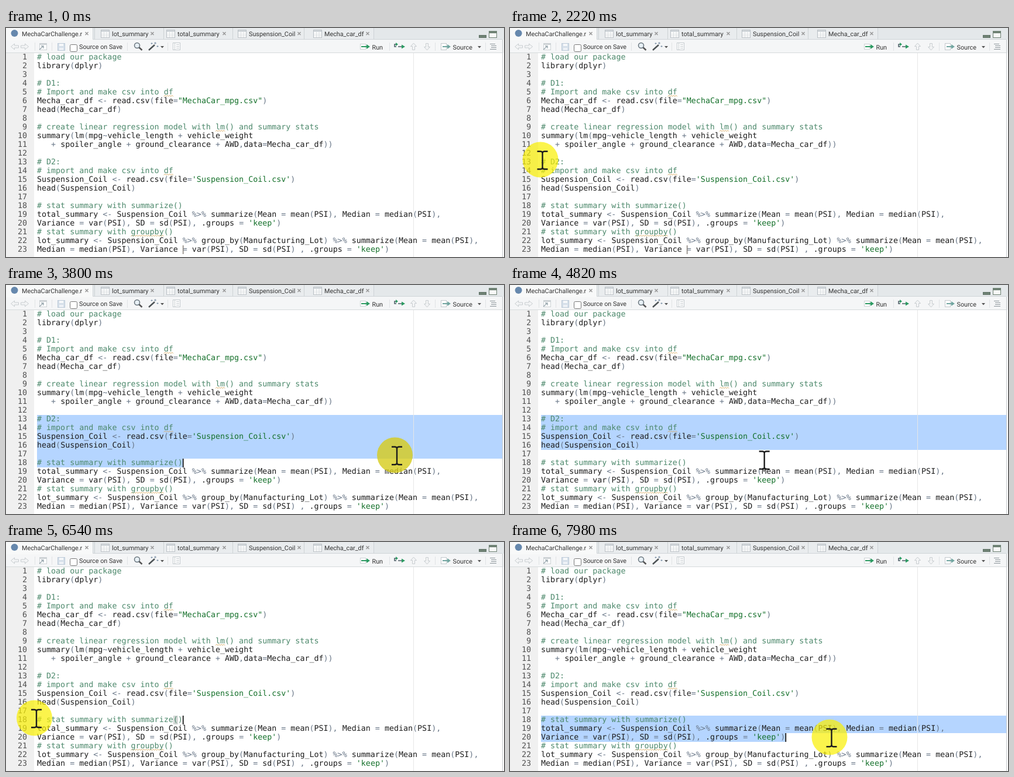
Animation, 851 px wide and 393 px high, one loop 8 s. Source, as an HTML page:

```html
<!DOCTYPE html>
<html lang="en">
<head>
<meta charset="utf-8">
<title>Script editor</title>
<style>
  html, body { margin: 0; width: 100%; height: 100%; overflow: hidden; background: #fff; }
  svg { display: block; width: 851px; height: 393px; }
  text { white-space: pre; text-rendering: geometricPrecision; }
  .code { font: 13.333px "DejaVu Sans Mono", monospace; fill: #1c1c1c; }
  .ui { font: 10.8px Roboto, sans-serif; fill: #333; }
  .num { fill: #505050; text-anchor: end; }
  .comment { fill: #4c886b; }
  .string { fill: #14702a; }
  .op { fill: #687687; }
</style>
</head>
<body>
<svg id="stage" viewBox="0 0 851 393">
  <g id="chrome"></g>
  <g id="selection" fill="#b5d5ff"></g>
  <path d="M696.5 43V393" stroke="#e6e6e6"/>
  <rect id="bracket" width="8" height="15" fill="#d2d6d4"/>
  <g id="squiggles" fill="none" stroke="#d3a04e" stroke-width=".9"></g>
  <g id="code"></g>
  <path d="M848.5 20V393" stroke="#c5c9cc"/>
  <rect id="caret" width="1.6" height="15"/>
  <g id="mouse">
    <circle id="press" cx="-3.5" cy="-1" r="30.5"/>
    <path d="M-9 -15.2H-3Q0 -15 0 -12Q0 -15 3 -15.2H9M0 -13V13M-9 15.2H-3Q0 15 0 12Q0 15 3 15.2H9"
          fill="none" stroke="#1c1c1c" stroke-width="2.4"/>
  </g>
</svg>
<script>
const LOOP = 8000, LEFT = 53, TOP = 43, ROW = 15, COL = 8.028, RIGHT = 848;
const lines = `# load our package
library(dplyr)

# D1:
# Import and make csv into df
Mecha_car_df <- read.csv(file="MechaCar_mpg.csv")
head(Mecha_car_df)

# create linear regression model with lm() and summary stats
summary(lm(mpg~vehicle_length + vehicle_weight
   + spoiler_angle + ground_clearance + AWD,data=Mecha_car_df))

# D2:
# import and make csv into df
Suspension_Coil <- read.csv(file='Suspension_Coil.csv')
head(Suspension_Coil)

# stat summary with summarize()
total_summary <- Suspension_Coil %>% summarize(Mean = mean(PSI), Median = median(PSI),
Variance = var(PSI), SD = sd(PSI), .groups = 'keep')
# stat summary with groupby()
lot_summary <- Suspension_Coil %>% group_by(Manufacturing_Lot) %>% summarize(Mean = mean(PSI),
Median = median(PSI), Variance = var(PSI), SD = sd(PSI) , .groups = 'keep')`.split('\n');

const $ = id => document.getElementById(id);
const lineY = line => TOP + (line - 1) * ROW;
const colX = col => LEFT + col * COL;

function add(parent, tag, attrs, content) {
  const el = document.createElementNS('http://www.w3.org/2000/svg', tag);
  for (const key in attrs) el.setAttribute(key, attrs[key]);
  if (content !== undefined) el.textContent = content;
  return parent.appendChild(el);
}

// Toolbar and tabs
const chrome = $('chrome');
const box = (x, y, width, height, fill, stroke = 'none') =>
  add(chrome, 'rect', { x, y, width, height, fill, stroke });
const stroke = (d, color, width = 1, fill = 'none') =>
  add(chrome, 'path', { d, stroke: color, 'stroke-width': width, fill });
const label = (x, y, words) => add(chrome, 'text', { x, y, class: 'ui' }, words);
const divider = x => stroke(`M${x}.5 25V39`, '#e0e3e5');
const dropdown = (x, y) => stroke(`M${x - 3} ${y}h6l-3 3.5z`, 'none', 0, '#555');

function tableIcon(x) {
  box(x + .5, 3.5, 14, 13, '#fff', '#b9bfc4');
  box(x + 1, 4, 13, 3, '#d5dade');
  stroke(`M${x + 1} 10.5h13M${x + 1} 13.5h13M${x + 5.5} 4v12M${x + 10} 4v12`, '#d3d8db', .8);
}

function tab(x, end, name, textX, closeX) {
  box(x + .5, -1.5, end - x, 21, '#e9ecee', '#cdd2d5');
  tableIcon(textX - 19);
  label(textX, 13.5, name);
  closeMark(closeX);
}

function closeMark(x) {
  stroke(`M${x - 2.5} 7l5 5m0 -5l-5 5`, '#999', 1.5);
}

function drawChrome() {
  box(0, 0, 851, 20, '#e4e8ea');
  tab(151, 269, 'lot_summary', 181, 250);
  tab(269, 387, 'total_summary', 293, 373);
  tab(387, 509, 'Suspension_Coil', 415, 501);
  tab(509, 628, 'Mecha_car_df', 544, 618);
  box(0, 20, 851, 23, '#f5f6f7');
  box(0, 0, 148, 21, '#f8f9f9');
  stroke('M148.5 0V19.5H848', '#d0d5d8');
  add(chrome, 'circle', { cx: 14.5, cy: 9, r: 6, fill: '#6688ad' });
  label(27, 13.5, 'MechaCarChallenge.r');
  closeMark(138);
  box(808.5, 12.5, 12, 4, '#6f8274', '#5f7266');
  box(825.5, 5.5, 13, 11, '#f7f8f7', '#6f8274');
  box(825, 5, 14, 4, '#6f8274');

  const pale = '#c8cdd0', green = '#2c9a62';
  stroke('M8.5 32l6-5v3h7v4h-7v3z', pale, 1, '#f3f4f5');
  stroke('M38.5 32l-6-5v3h-7v4h7v3z', pale, 1, '#f3f4f5');
  [49, 78, 207, 276, 655, 733, 819].forEach(divider);
  box(57.5, 26.5, 12, 11, '#fff', '#ccd1d4');
  stroke('M57 28h13', '#ccd1d4', 2);
  stroke('M57 37l7-6m-4 0h4v4', '#97a5ac', 1.3);
  box(88.5, 26.5, 12, 12, '#d5dfe9', '#bccad8');
  box(91, 27, 7, 4, '#f6f8fa');
  box(91, 34, 7, 4, '#eef2f6');
  add(chrome, 'rect', { x: 109.5, y: 28.5, width: 12, height: 12, rx: 2, fill: '#fff', stroke: '#777' });
  label(125, 36, 'Source on Save');
  stroke('M227 33l5.5 5', '#555', 2.5);
  add(chrome, 'circle', { cx: 224, cy: 30, r: 4.5, fill: '#e8f0f6', stroke: '#68747c', 'stroke-width': 1.5 });
  stroke('M244 38l10-9', '#4d5356', 2.5);
  stroke('M255 24v4m-2-2h4M259 30v3m-1.5-1.5h3M249 25v3m-1.5-1.5h3', '#7c91a6');
  dropdown(267, 31);
  box(285.5, 25.5, 12, 12, '#fff', '#c3c9cd');
  stroke('M288.5 26v11M291 28.5h5M291 31.5h5M291 34.5h5', '#c3c9cd');

  box(605.5, 27.5, 9, 9, '#fff', '#ccd1d4');
  stroke('M607 32h10', green, 2);
  stroke('M616 28l6 4l-6 4z', 'none', 0, green);
  label(625.5, 36.5, 'Run');
  stroke('M667 28h-3v4h3m3 0h7', '#4f5f68', 1.6);
  stroke('M666 25l4 3l-4 3zM676 28.5l6 3.5l-6 3.5z', 'none', 0, green);
  stroke('M696.5 26l5 5.5h-3v6h-4v-6h-3z', pale, 1, '#f3f4f5');
  stroke('M719.5 38l5-5.5h-3v-6h-4v6h-3z', pale, 1, '#f3f4f5');
  box(743.5, 26.5, 9, 11, '#fff', '#c3c9cd');
  stroke('M746 32h9', '#71a5a0', 2);
  stroke('M754 28l6 4l-6 4z', 'none', 0, '#71a5a0');
  label(763.5, 36.5, 'Source');
  dropdown(809, 31);
  stroke('M827 27.5h9M829 30.5h9M829 33.5h9M827 36.5h11', '#8b9499');
  stroke('M0 42.5H848', '#d6dadc');
  box(0, 43, 48, 350, '#f0f0f0');
}

// Source text
function drawLine(source, index) {
  const line = index + 1, y = lineY(line) + 11.2;
  add($('code'), 'text', { x: 36, y, class: 'code num' }, line);
  const text = add($('code'), 'text', { x: LEFT, y, class: 'code' });
  if (source[0] === '#') {
    add(text, 'tspan', { class: 'comment' }, source);
    return;
  }
  for (const part of source.split(/(["'][^"']*["']|%>%|<-|[()~+=,])/)) {
    if (!part) continue;
    const kind = /^["']/.test(part) ? 'string' : /^(%>%|<-|[()~+=,])$/.test(part) ? 'op' : 'name';
    add(text, 'tspan', { class: kind }, part);
  }
}

function squiggle(line, word) {
  const start = lines[line - 1].indexOf(word);
  const steps = Math.round(word.length * COL / 2);
  let d = `M${colX(start)} ${lineY(line) + 14.5}`;
  for (let i = 0; i < steps; i++) d += `l2 ${i % 2 ? 2 : -2}`;
  add($('squiggles'), 'path', { d });
}

drawChrome();
lines.forEach(drawLine);
[[5, 'df'], [9, 'lm'], [14, 'df'], [21, 'groupby']].forEach(args => squiggle(...args));

// Pointer: time, x, y
const path = [
  [540, 668, 390], [820, 430, 350], [1060, 190, 305], [1280, 78, 277], [1560, 55.5, 227],
  [2220, 55.5, 227], [2430, 110, 240], [2850, 353, 285], [2990, 450, 291], [3200, 610, 302],
  [3340, 668.5, 305], [3799, 668.5, 305], [3800, 668, 293], [3870, 668, 289],
  [4270, 668, 289], [4900, 368, 304], [5100, 358, 305], [5590, 99.5, 316], [5880, 52, 346],
  [6340, 52, 303], [6540, 52, 303], [6600, 58, 303], [6950, 245, 312], [7020, 282, 316.5],
  [7300, 486, 322], [7640, 547, 327], [7840, 548, 330], [7980, 549.5, 336]
];
const runs = [540, 2220, 3800, 4270, 5100, 6540, 6600, 7840];
const presses = [[2220, 4270], [4960, 5170], [6540, LOOP]];
const releases = [[3800, 4270]];
const blinks = [[4370, 4870], [5600, 6100]];
const STEP = 70;
const within = (spans, t) => spans.some(([from, to]) => t >= from && t < to);

function stepTime(t) {
  const run = runs.filter(start => start <= t).pop() || 0;
  return run + Math.floor((t - run) / STEP) * STEP;
}

function pointer(t) {
  const next = path.findIndex(key => key[0] > t);
  if (next < 0) return path[path.length - 1].slice(1);
  if (next === 0) return path[0].slice(1);
  const a = path[next - 1], b = path[next], k = (t - a[0]) / (b[0] - a[0]);
  return [a[1] + (b[1] - a[1]) * k, a[2] + (b[2] - a[2]) * k];
}

function textPosition([x, y]) {
  const line = Math.floor((y - TOP) / ROW) + 1;
  const col = Math.max(0, Math.round((x - LEFT) / COL));
  return { line, col: Math.min(col, lines[line - 1].length) };
}

// Caret and selection trail the pointer by one step.
function editorState(t) {
  if (t < 2220 + STEP) return { line: 23, col: 31, idle: true };
  if (t >= 5100 && t < 6600) return { line: 18, col: 31, bracket: true };
  const caret = textPosition(pointer(Math.min(t, t < 5100 ? 4200 : LOOP) - STEP));
  return { ...caret, anchor: t < 5100 ? 13 : 18 };
}

const rows = Array.from({ length: 8 }, () => add($('selection'), 'rect', { x: LEFT, height: ROW }));

function render(t) {
  const time = stepTime(t), state = editorState(time);
  const [x, y] = pointer(time);
  const press = $('press');
  $('mouse').setAttribute('transform', `translate(${x} ${y})`);
  $('mouse').style.display = t < 540 ? 'none' : '';
  press.style.display = within(presses, t) ? '' : 'none';
  press.setAttribute('fill', within(releases, t) ? 'rgba(214,204,28,.8)' : 'rgba(250,240,0,.7)');

  rows.forEach((row, i) => {
    const line = state.anchor + i;
    const shown = state.anchor && line <= state.line;
    row.setAttribute('y', shown ? lineY(line) : 0);
    row.setAttribute('width', !shown ? 0 : line < state.line ? RIGHT - LEFT : state.col * COL);
  });

  const caret = $('caret');
  caret.setAttribute('x', colX(state.col));
  caret.setAttribute('y', lineY(state.line));
  caret.setAttribute('fill', state.idle ? '#8d8780' : '#000');
  caret.style.display = within(blinks, t) ? 'none' : '';
  $('bracket').style.display = state.bracket ? '' : 'none';
}

$('bracket').setAttribute('x', colX(29));
$('bracket').setAttribute('y', lineY(18));

const began = performance.now();
function tick() {
  render((performance.now() - began) % LOOP);
  requestAnimationFrame(tick);
}
tick();
</script>
</body>
</html>
```
